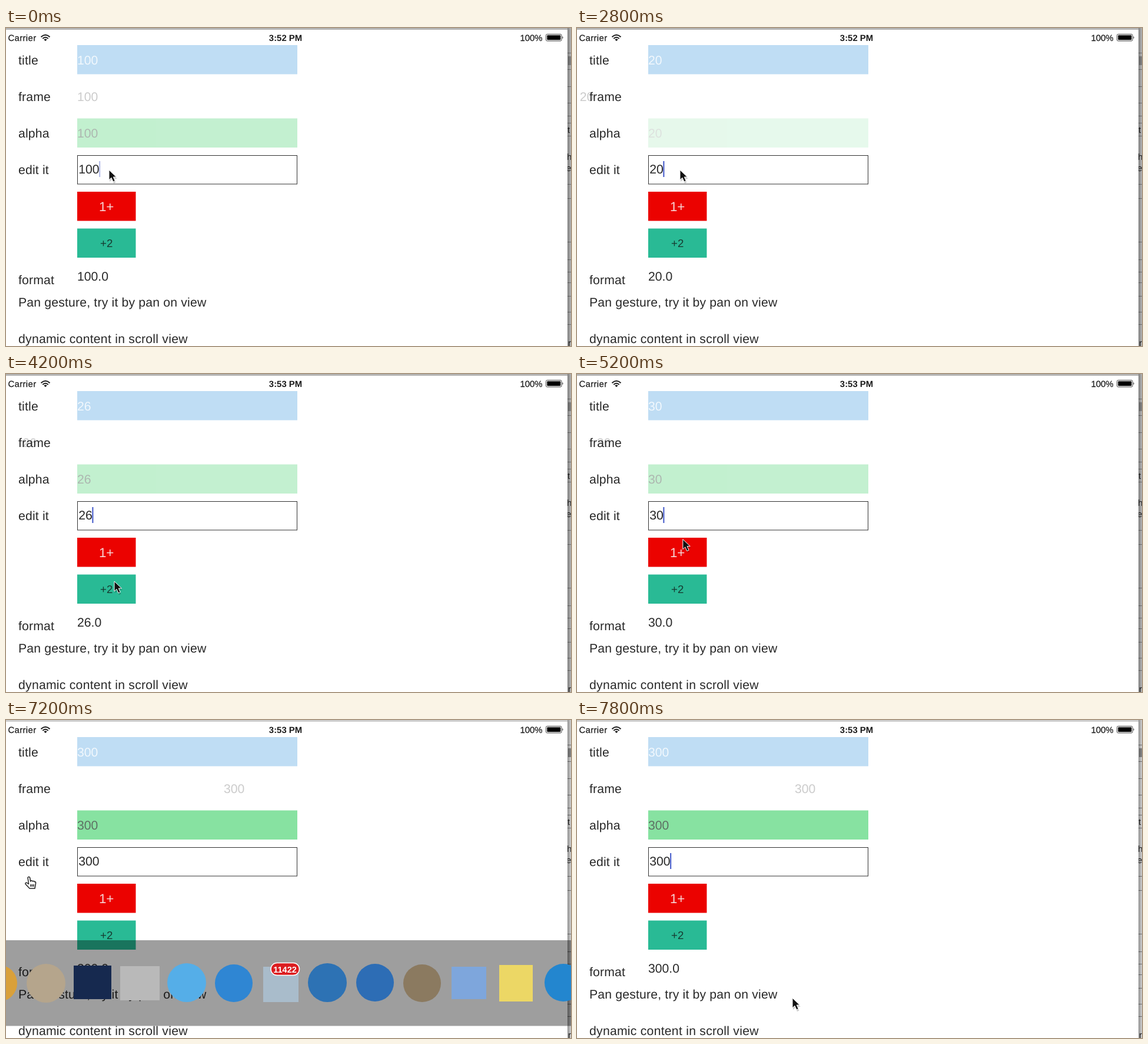
An HTML page that plays this animation: 960 by 540 pixels, repeating every 8 s.

```html
<!DOCTYPE html>
<html lang="en">
<head>
<meta charset="utf-8">
<title>Data binding demo</title>
<style>
  html, body { margin: 0; width: 100%; height: 100%; overflow: hidden; background: #fff; }
  svg { display: block; width: 960px; height: 540px; }
  text {
    font: 21.2px "Liberation Sans", Arial, sans-serif; fill: #282828;
    white-space: pre; text-rendering: geometricPrecision;
  }
  .status text { font-size: 14.9px; fill: #1c1c1c; }
  .status .medium { stroke: #1c1c1c; stroke-width: .25px; }
  .status .bold { font-weight: bold; }
  .label { letter-spacing: .18px; }
  .mid { text-anchor: middle; }
  .edge text { font-size: 15px; fill: #222; }
</style>
</head>
<body>
<svg viewBox="0 0 960 540">
  <defs>
    <linearGradient id="shade">
      <stop offset="0" stop-color="#000" stop-opacity=".3"/>
      <stop offset="1" stop-color="#000" stop-opacity="0"/>
    </linearGradient>
  </defs>

  <!-- window behind the simulator -->
  <rect id="back" width="960" height="540"/>
  <g class="edge">
    <path id="rules" stroke="#777"/>
    <rect x="955" y="48" width="5" height="15" fill="#858585"/>
    <text x="954" y="178">t</text>
    <text x="953" y="224">h</text>
    <text x="952" y="243">e,</text>
    <text x="955" y="540">r</text>
    <rect x="954" width="6" height="540" fill="url(#shade)"/>
  </g>
  <rect y="3" width="954" height="537" fill="#fff"/>

  <g class="status">
    <text class="medium" x="3.5" y="22" letter-spacing=".35">Carrier</text>
    <path d="M59.5 15.2Q67 8.4 74.5 15.2M62.3 18Q67 13.6 71.7 18" fill="none" stroke="#1c1c1c" stroke-width="2"/>
    <path d="M64.3 19.6Q67 17.4 69.7 19.6L67 22.3Z" fill="#1c1c1c"/>
    <text class="bold mid" id="clock" x="475" y="22"></text>
    <text class="medium" x="873.5" y="22">100%</text>
    <rect x="917.5" y="10.5" width="26.5" height="11.5" rx="2" fill="none" stroke="#444"/>
    <rect x="919.3" y="12.3" width="23" height="8" rx="1" fill="#000"/>
    <path d="M945.3 14Q948 16.2 945.3 18.5Z" fill="#444"/>
  </g>

  <rect x="121" y="29" width="374" height="49.5" fill="#bfddf4"/>
  <text id="title" x="121" y="61.5" style="fill:#f2f8fd"></text>
  <text id="frame" y="123.5" style="fill:#cbcbcb"></text>
  <g id="alpha">
    <rect x="121" y="153.5" width="374" height="49.5" fill="#87e2a1"/>
    <text id="alphaText" x="121" y="186" style="fill:#5d7063"></text>
  </g>

  <g class="label">
    <text x="21" y="61.5">title</text>
    <text x="21" y="123.5">frame</text>
    <text x="21" y="186">alpha</text>
    <text x="21" y="248">edit it</text>
    <text x="21" y="435">format</text>
    <text x="21" y="472.5">Pan gesture, try it by pan on view</text>
    <text x="21" y="535" letter-spacing=".25">dynamic content in scroll view</text>
  </g>

  <rect x="121.5" y="216.5" width="373" height="48.5" fill="#fff" stroke="#333"/>
  <text id="field" x="123.3" y="247"></text>
  <rect id="caret" y="226" width="2" height="27" fill="#3f55c8"/>

  <rect x="121" y="278" width="99.5" height="49.5" fill="#eb0200"/>
  <text class="mid" x="170.7" y="310.5" style="font-size:22.4px;fill:#f7d5d5">1+</text>
  <rect x="121" y="340.5" width="99.5" height="49.5" fill="#29ba95"/>
  <text class="mid" x="170.7" y="371.5" style="font-size:18.7px;fill:#173c32">+2</text>
  <text id="format" x="121" y="429"></text>

  <!-- app switcher -->
  <g id="dock">
    <rect y="374" width="960" height="145.5" fill="#000" fill-opacity=".38"/>
    <circle cx="-12" cy="447" r="31" fill="#d9a03a"/>
    <circle cx="68" cy="447" r="33" fill="#b5a58c"/>
    <rect x="115" y="417" width="64" height="57" fill="#16294f"/>
    <rect x="194" y="418" width="67" height="58" fill="#b9b9b9"/>
    <circle cx="307" cy="446" r="33" fill="#55aee8"/>
    <circle cx="387" cy="447" r="32" fill="#2f86d3"/>
    <rect x="437" y="419" width="60" height="60" fill="#a9bccb"/>
    <circle cx="546" cy="446" r="33" fill="#2d72b4"/>
    <circle cx="627" cy="446" r="32" fill="#2d6db5"/>
    <circle cx="707" cy="447" r="32" fill="#8b7a60"/>
    <rect x="757" y="419" width="59" height="55" fill="#7ea6dc"/>
    <rect x="838" y="416" width="57" height="62" fill="#ecd765"/>
    <circle cx="947" cy="446" r="32" fill="#2386cf"/>
    <rect x="450" y="412.5" width="48.5" height="21" rx="10.5" fill="#dc1d20" stroke="#fff" stroke-width="1.5"/>
    <text class="mid" x="474" y="428.5" style="font-size:14.5px;font-weight:bold;fill:#fff">11422</text>
  </g>

  <g id="arrow">
    <path d="M1 3V20L5 16.5L8 23L11.5 21.5L8.5 15H14Z" fill="#000" opacity=".2"/>
    <path d="M0 0V17L4 13.3L7 20L10.3 18.5L7.3 12H12.5Z" fill="#111" stroke="#fff"/>
  </g>
  <g id="hand" stroke="#222" stroke-width="1.5" stroke-linejoin="round">
    <path fill="#fff" d="M0 1.5Q2-1 3.5 1.5L4.7 8Q7 5.5 8.5 8Q10.500 6.500 12 9Q14 8 13.500 11.500L12 20H3L-4 12.500Q-4.500 9.500-1.500 10.500L1.500 12.500Z"/>
    <path fill="none" d="M5 13V17M7.500 13V17M10 13V17"/>
  </g>
</svg>

<script>
  const LOOP = 8000, STEP = 200, EASE = 300;
  const $ = id => document.getElementById(id);

  // [time, text in the field]
  const edits = [
    [0, "100"], [500, "10"], [800, "1"], [1050, "15"],
    [1700, "1"], [2000, ""], [2300, "2"], [2700, "20"],
    [3200, "21"], [3500, "22"], [3800, "24"], [4000, "26"],
    [4600, "28"], [4900, "30"], [5750, "300"]
  ];

  // [time, x, y] of the pointer
  const path = [
    [0, 175, 241], [2800, 175, 241], [3200, 181, 297], [3500, 182, 300],
    [3800, 184, 352], [4900, 184, 352], [5400, 177, 233], [6400, 177, 233],
    [6800, 44, 262], [7200, 37, 266], [7400, 37, 266], [7800, 366, 472]
  ];

  const mix = (a, b, p) => a + (b - a) * p;
  const smooth = p => p * p * (3 - 2 * p);
  const offset = v => 1.245 * v - 3.5;
  const opacity = v => v > 100 ? 1 : v >= 10 ? .5 : .1;

  function pointer(t) {
    const i = path.findLastIndex(k => k[0] <= t);
    const a = path[i], b = path[i + 1] || a;
    const p = b === a ? 0 : (t - a[0]) / (b[0] - a[0]);
    return [mix(a[1], b[1], p), mix(a[2], b[2], p)];
  }

  function draw(t) {
    const i = edits.findLastIndex(k => k[0] <= t);
    const [since, value] = edits[i];
    const last = i ? edits[i - 1][1] : value;
    const p = smooth(Math.min(1, (t - since) / EASE));

    for (const id of ["title", "frame", "alphaText", "field"]) $(id).textContent = value;
    $("format").textContent = (+value).toFixed(1);
    $("frame").setAttribute("x", mix(offset(+last), offset(+value), p));
    $("alpha").setAttribute("opacity", mix(opacity(+last), opacity(+value), p));
    $("clock").textContent = t < 3800 ? "3:52 PM" : "3:53 PM";

    const switching = t >= 7200 && t < 7600;
    $("dock").style.display = switching ? "" : "none";
    $("caret").setAttribute("x", 122.8 + 11.8 * value.length);
    $("caret").setAttribute("opacity", switching ? 0 : t % 1000 ? 1 : .4);
    $("back").setAttribute("fill", t < 7000 ? "#b4b4b4" : "#cecece");

    const at = "translate(" + pointer(t) + ")";
    for (const id of ["arrow", "hand"]) $(id).setAttribute("transform", at);
    $("arrow").style.display = switching ? "none" : "";
    $("hand").style.display = switching ? "" : "none";
  }

  const rules = [42, 70, 99, 127, 149, 161, 183, 265, 289, 363, 393, 414, 432, 455, 482, 503];
  $("rules").setAttribute("d", rules.map(y => `M954 ${y + .5}h6`).join(""));

  const start = performance.now();
  function tick() {
    const t = (performance.now() - start) % LOOP;
    draw(Math.floor(t / STEP) * STEP);
    requestAnimationFrame(tick);
  }
  tick();
</script>
</body>
</html>
```
